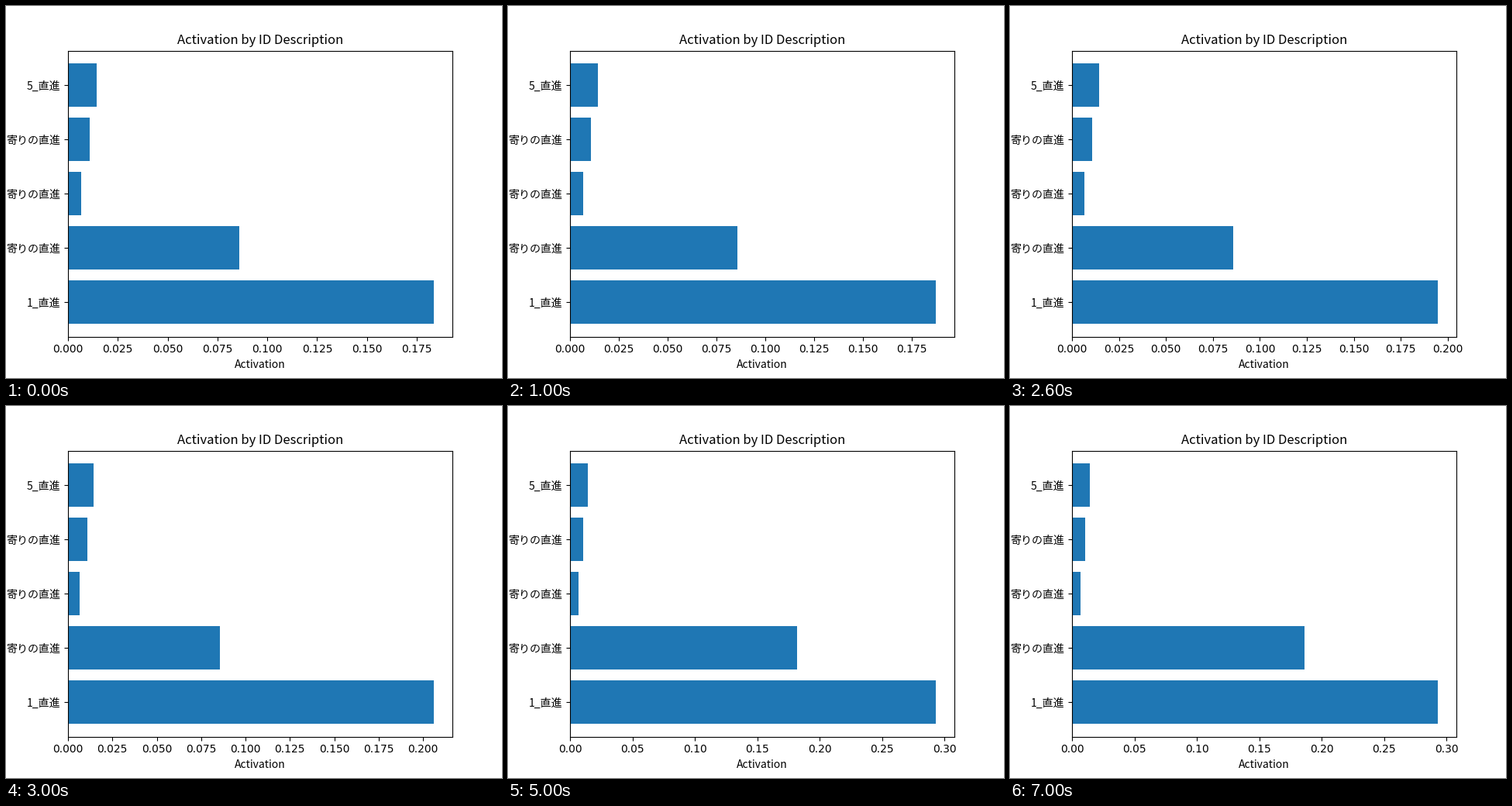
Recreate the animation shown at these times as a matplotlib script. Size 640 by 480 pixels, loop 8 s.

```python
import matplotlib.pyplot as plt
from matplotlib.animation import FuncAnimation

plt.rcParams["font.family"] = "Noto Sans CJK JP"

LABELS = ["1_直進", "寄りの直進", "寄りの直進", "寄りの直進", "5_直進"]
STEADY = [0.0066, 0.0108, 0.0144]

# One value per second for the two bars that change.
FIRST = [0.1837, 0.1873, 0.1948, 0.2062] + [0.2932] * 4
SECOND = [0.08576] * 5 + [0.1819, 0.1819, 0.1862]

fig, ax = plt.subplots(figsize=(6.4, 4.8), dpi=100)
bars = ax.barh(range(len(LABELS)), [0] * len(LABELS), color="#1f77b4")
ax.set_yticks(range(len(LABELS)), LABELS)
ax.set_ylim(-0.64, 4.64)
ax.set_title("Activation by ID Description")
ax.set_xlabel("Activation")
ax.tick_params(axis="x", labelfontfamily="DejaVu Sans", pad=2.8)
ax.tick_params(axis="y", labelsize=10.08)


def update(second):
    values = [FIRST[second], SECOND[second], *STEADY]
    for bar, value in zip(bars, values):
        bar.set_width(value)
    ax.set_xlim(0, max(values) * 1.05)
    return bars


anim = FuncAnimation(fig, update, frames=len(FIRST), interval=1000, repeat=True)
plt.show()
```
